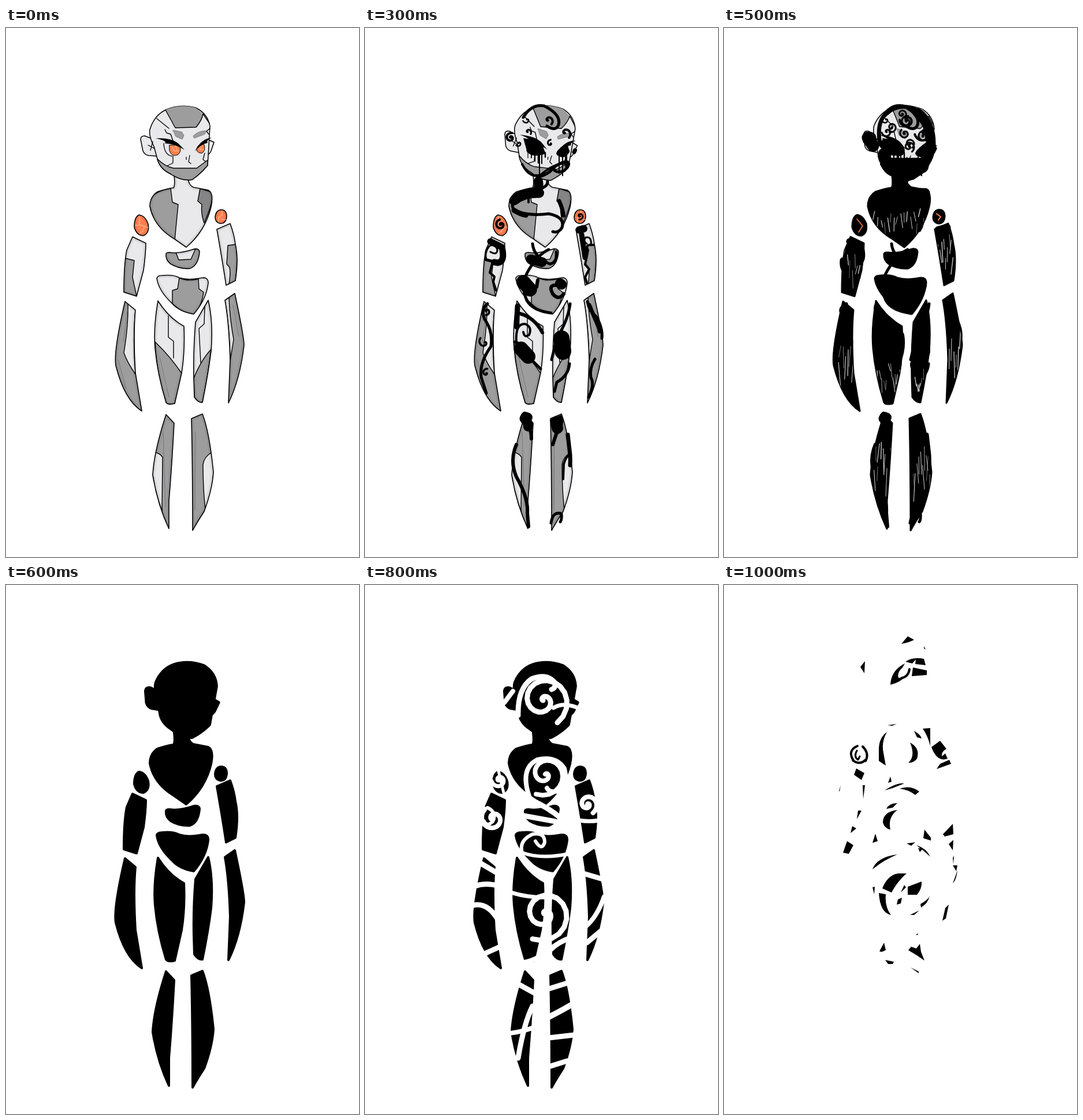
Write an HTML page that moves like this. It is 611 by 917 pixels and loops after 1.1 s.

```html
<!DOCTYPE html>
<html lang="en">
<head>
<meta charset="utf-8">
<title>Ink figure</title>
<style>
html, body { margin: 0; width: 100%; height: 100%; overflow: hidden; background: #fff; }
svg { display: block; width: 100vw; height: 100vh; }
</style>
</head>
<body>
<svg id="stage" viewBox="0 0 611 917" fill="none" stroke-linecap="round" stroke-linejoin="round"></svg>
<script>
const STEP = 100, STEPS = 11;
const LIGHT = '#e9e8eb', DARK = '#9d9d9d', GLOW = '#ff8051';
const stage = document.getElementById('stage');

function el(tag, attrs, parent) {
  const node = document.createElementNS('http://www.w3.org/2000/svg', tag);
  for (const key in attrs) node.setAttribute(key, attrs[key]);
  return parent.appendChild(node);
}
const layer = (parent = stage) => el('g', {}, parent);
const defs = el('defs', {}, stage);
const art = layer(), head = layer(art);
const inkA = layer(), inkB = layer(), drips = layer(), flood = layer(), headFlood = layer();
const solid = layer(), solidHead = layer(solid);
const cutA = layer(), cutB = layer();
const shards = layer(), shardsMid = layer(shards), shardsBoth = layer(shards), shardsEnd = layer(shards);

let seed = 7;
const rnd = (a, b) => a + (b - a) * ((seed = seed * 16807 % 2147483647) / 2147483647);
const fill = (parent, d, color = '#000') => el('path', { d, fill: color }, parent);
const line = (parent, w, d, color = '#000') =>
  el('path', { d, stroke: color, 'stroke-width': w, pathLength: 1 }, parent);

// Spiral from the centre outwards, ending at angle a.
function curl(parent, w, x, y, r, a = 0, turns = 1.5, color) {
  let d = '';
  for (let i = 0; i <= 30; i++) {
    const k = i / 30, t = a - (1 - k) * turns * 6.283;
    d += (i ? 'L' : 'M') + (x + r * k * Math.cos(t)).toFixed(1) + ',' + (y + r * k * Math.sin(t)).toFixed(1);
  }
  line(parent, w, d, color);
}

let count = 0;
// panels: [path, colour]; run: box of the dripping ink, x0 y0 x1 y1 and number of drips
function part(d, base, panels, detail, run) {
  const id = 'clip' + count++;
  el('path', { d }, el('clipPath', { id }, defs));
  const g = layer(art), inner = el('g', { 'clip-path': `url(#${id})` }, g);
  fill(inner, d, base);
  for (const [p, color] of panels) {
    fill(inner, p, color);
    line(inner, 1.4, p);
  }
  line(inner, 8, d, '#00000014');
  if (detail) line(inner, 1.4, detail);
  line(g, 1.6, d);
  el('path', { d, fill: '#000', stroke: '#000', 'stroke-width': 4 }, solid);
  el('path', { d, fill: '#000', stroke: '#000', 'stroke-width': 3 }, flood);
  if (!run) return;
  const [x0, y0, x1, y1, n] = run, h = y1 - y0;
  const wet = el('g', { 'clip-path': `url(#${id})` }, drips);
  const gaps = el('g', { 'clip-path': `url(#${id})` }, flood);
  for (let i = 0; i < n; i++) {
    const x = x0 + (x1 - x0) * (i + .5) / n, lean = rnd(-4, 4);
    line(wet, rnd(1.2, 4), `M${x},${y0}q${lean},${h * .3} ${lean / 2},${h * rnd(.5, 1)}`);
    const top = y0 + h * rnd(.15, .6);
    line(gaps, rnd(.5, 1.5), `M${x + 2},${top}l${lean},${h * rnd(.15, .35)}`, '#c4c4c6');
  }
}

// Torso
part('M291,256Q293,272 290,277Q280,278 262,284Q249,293 249,309Q256,345 292,366L312,380Q345,352 355,310Q360,286 350,281L324,276Q316,272 315,260Z', LIGHT,
  [['M285,278L288,302L298,306L292,368Q240,340 247,300Q255,283 285,278Z', DARK],
   ['M336,278L332,300L339,306Q337,322 343,338Q360,300 357,285Z', '#858585']], '', [256, 300, 352, 372, 17]);
part('M277,392Q276,402 285,409Q300,418 318,417Q333,412 335,388Q334,382 326,383Q300,392 283,389Q277,389 277,392Z', DARK,
  [['M294,389L299,402L320,401L328,383Z', LIGHT]]);
part('M261,434Q262,429 270,429Q290,427 300,433Q315,438 340,433Q350,432 350,442Q347,470 325,496Q300,492 287,477Q264,455 261,434Z', LIGHT,
  [['M300,433L297,452L288,455L288,478Q305,494 325,496Q338,485 342,458L334,452L333,435Q315,440 300,433Z', DARK]]);

// Shoulders and arms
part('M230,324Q241,325 246,340Q249,355 238,360Q226,360 222,345Q222,328 230,324Z', GLOW, []);
part('M372,315Q382,315 382,327Q381,339 371,339Q362,337 362,328Q363,316 372,315Z', GLOW, []);
line(art, 1, 'M231,327V341L246,346M239,346L236,353L231,356M224,342H231M374,317V325L368,328V336M372,332H381', '#ffc9a6');
part('M219,362L242,373Q242,390 238,420L226,465L204,458Q204,410 209,385Z', LIGHT,
  [['M206,399L222,403L219,432L226,465L204,458Q203,425 206,399Z', DARK]], '', [205, 370, 240, 460, 8]);
part('M365,349L388,339Q395,358 397,375Q403,400 397,438L381,446Q374,400 365,349Z', LIGHT,
  [['M384,377L398,375Q402,405 397,438L386,444Q389,425 387,415L382,409Z', DARK]], '', [367, 342, 396, 442, 9]);
part('M206,474L224,489Q220,530 224,598L235,664Q205,645 190,585Q186,560 206,474Z', DARK,
  [['M211,478L224,489Q219,540 224,600Q210,580 204,563Q212,515 211,478Z', LIGHT]], '', [194, 525, 232, 655, 9]);
part('M396,460L379,472Q386,510 388,575L385,650Q405,610 412,550Q412,535 396,460Z', DARK,
  [['M379,472L386,467Q387,500 394,540L388,577Q387,520 379,472Z', LIGHT]], '', [386, 490, 410, 620, 6]);

// Legs
part('M263,473Q282,503 308,517Q310,560 304,598L292,651Q280,654 277,649Q262,600 258,555Q255,520 263,473Z', LIGHT,
  [['M258,544Q285,570 305,600L292,651Q280,654 277,649Q260,595 258,544Z', DARK]],
  'M281,499L281,536L290,543V572', [261, 565, 304, 648, 11]);
part('M350,472L328,510Q324,560 325,607L326,640Q333,650 340,649Q350,600 355,560Q359,510 350,472Z', LIGHT,
  [['M325,607Q338,575 355,557Q350,600 340,649Q333,651 326,640Z', DARK]],
  'M344,483L343,513L334,521L337,580', [327, 580, 351, 647, 8]);
part('M277,670L291,685Q287,760 282,820V868Q262,825 254,775Q256,735 277,670Z', DARK,
  [['M259,736Q266,737 271,744L270,838Q257,800 254,775Q255,748 259,736Z', LIGHT]], '', [256, 695, 288, 845, 10]);
part('M340,669L321,677Q323,760 323,871Q330,858 343,838Q357,800 359,770Q352,700 340,669Z', DARK,
  [['M355,736Q342,745 341,757Q341,800 345,835Q358,800 359,770Q359,750 355,736Z', LIGHT]], '', [324, 695, 356, 845, 10]);
line(art, 1, 'M210,490L203,545M194,575L208,625M266,570L282,640M272,700L276,830M328,700L327,835M393,480L403,535', '#77777a');

// Head
const skull = 'M262,227L256,205Q247,188 249,176Q256,152 276,142Q300,131 328,138Q349,148 353,170L351,205L349,238Q338,252 322,263Q305,266 285,253Q266,244 262,227Z';
const ears = 'M256,193L240,187Q233,187 233,193L237,213Q240,220 247,221L261,222ZM351,194L360,198L355,213Q352,219 349,220Z';
art.appendChild(head);
for (const d of [ears, skull]) {
  fill(head, d, LIGHT);
  line(head, 1.5, d);
  el('path', { d, fill: '#000', stroke: '#000', 'stroke-width': 6 }, solidHead);
}
fill(head, 'M276,142Q300,131 328,138L341,149Q339,160 329,172L293,173Z', DARK);
line(head, 1.4, 'M276,142L293,173L329,172Q339,160 341,149M341,149L352,165M261,157L282,174M275,176L278,182L285,184L291,201M353,174L347,179L351,184');
line(head, 1.3, 'M246,203L257,209M254,197L250,212M273,200Q274,220 287,222M289,222V234L279,239M344,217L341,228L349,234M318,221L316,232L320,235M312,224V228');
for (const d of ['M289,177L304,180L308,186L305,193L294,188Z', 'M324,187Q333,178 347,178L344,184L326,191Z']) {
  fill(head, d, DARK);
  line(head, .7, d, '#666');
}
for (const d of ['M283,203L299,203Q306,213 297,220Q287,224 283,213Z', 'M332,205Q337,200 343,202Q346,213 339,217Q331,217 330,211Z']) {
  fill(head, d, GLOW);
  line(head, 1, d);
}
line(head, 1, 'M288,206L291,213H298M293,204L296,211M336,205V211H342', '#ffc9a6');
fill(head, 'M259,191Q286,190 298,200L309,211Q290,200 275,200Q280,196 259,191Z');
fill(head, 'M356,190Q337,192 327,214Q336,202 349,199Q346,195 356,190Z');
const mask = 'M262,227Q275,240 290,243H330L349,229V238Q338,252 322,263Q305,266 285,253Q266,244 262,227Z';
fill(head, mask, DARK);
line(head, 1.4, mask);

// First vines
line(inkA, 5, 'M274,155Q288,131 310,135Q340,150 335,168Q330,180 315,170');
line(inkA, 5, 'M296,256Q305,260 320,249Q335,232 350,232Q357,236 345,247Q335,252 328,247');
line(inkA, 7, 'M283,212Q290,221 307,216');
line(inkA, 6, 'M337,217Q344,221 351,213');
line(inkA, 2, 'M302,218V258');
line(inkA, 2, 'M347,215V240');
line(inkA, 5, 'M316,266Q317,275 300,280Q265,288 258,298Q250,313 265,319Q290,326 318,322Q347,328 341,346Q335,356 325,353');
line(inkA, 4, 'M283,287V302');
line(inkA, 5, 'M290,374Q292,397 320,409Q333,407 331,388');
line(inkA, 5, 'M318,384Q300,392 283,420Q268,445 280,472Q290,490 322,494');
line(inkA, 6, 'M299,437L297,449Q289,450 288,462L283,457');
line(inkA, 6, 'M333,446Q316,444 325,461Q335,473 344,461');
line(inkA, 3, 'M217,388Q229,395 229,384Q225,373 215,378Q206,390 210,401');
line(inkA, 4, 'M209,402L221,405L216,424L224,431L222,440L227,455');
line(inkA, 3, 'M384,374Q377,370 382,363Q393,361 391,377');
line(inkA, 4, 'M396,376Q380,374 386,385L381,410L388,418L381,432L384,442');
line(inkA, 5, 'M212,478Q200,488 207,505Q222,525 218,552Q198,580 201,605L210,633');
line(inkA, 5, 'M385,474Q388,492 400,500Q412,520 410,538');
line(inkA, 5, 'M398,574Q388,590 391,606Q398,618 387,640');
line(inkA, 4, 'M262,544Q260,512 277,513Q290,518 284,532Q276,538 274,527');
line(inkA, 5, 'M259,544Q275,548 284,571L304,591');
line(inkA, 5, 'M355,478Q352,505 332,538L323,575');
line(inkA, 5, 'M354,582Q352,603 332,614L328,630');
line(inkA, 6, 'M288,712Q288,690 276,684Q268,674 276,668Q290,670 286,678');
line(inkA, 6, 'M262,722Q250,750 262,778Q283,815 281,840L283,864');
line(inkA, 6, 'M323,681L339,674Q343,690 331,704L325,722');
line(inkA, 4, 'M343,782L344,756Q349,740 355,740');
line(inkA, 5, 'M322,858Q325,837 340,842Q341,852 338,856');

// Thick growth
fill(inkB, 'M274,191Q297,193 308,206L313,218Q294,224 281,216Z');
fill(inkB, 'M331,217Q335,206 351,203L354,215Q345,230 332,220Z');
line(inkB, 7, 'M362,215L365,209');
curl(inkB, 4, 252, 190, 12, 2.5, 2);
curl(inkB, 2.5, 280, 159, 10, 5, 1.1);
curl(inkB, 4, 317, 160, 13, 3.2, 1.2);
curl(inkB, 4, 346, 182, 16, 3, 1.1);
curl(inkB, 3, 321, 200, 9, 1, 1.3);
curl(inkB, 3, 282, 180, 9, 3, 1.2);
curl(inkB, 2.5, 266, 200, 8, 5, 1.3);
line(inkB, 4, 'M272,236Q285,262 305,254Q330,232 352,235Q355,250 335,252Q310,260 285,243');
for (let x = 282; x < 314; x += 6) line(inkB, rnd(1, 3), `M${x},216V${rnd(228, 258)}`);
line(inkB, 2, 'M336,218V252M342,220V256M349,215V238');
line(inkB, 16, 'M300,266Q302,278 297,282L315,277');
line(inkB, 17, 'M258,299Q275,285 300,286L348,286');
line(inkB, 9, 'M258,316Q280,330 300,322');
line(inkB, 7, 'M336,300Q350,330 338,350');
curl(inkB, 4, 235, 341, 13, 2, 2);
curl(inkB, 3, 372, 326, 9, 5, 1.7);
line(inkB, 17, 'M287,401L306,406L322,393');
line(inkB, 24, 'M274,440L288,456L296,468');
line(inkB, 18, 'M338,443L342,446');
line(inkB, 11, 'M217,370L237,380Q243,405 230,407L206,403Q204,420 218,426L231,432');
line(inkB, 13, 'M371,350L386,346');
line(inkB, 9, 'M375,358L382,405L384,438');
curl(inkB, 3.5, 210, 491, 10, 4, 1.2);
curl(inkB, 3.5, 207, 545, 15, 0, 1.2);
curl(inkB, 3.5, 210, 598, 11, 1, 1.2);
line(inkB, 7, 'M388,480L405,520Q411,545 404,575');
line(inkB, 9, 'M264,482Q262,515 263,555');
line(inkB, 6, 'M268,495Q295,502 309,532Q313,555 303,580');
line(inkB, 25, 'M270,556L295,583');
line(inkB, 28, 'M340,538L343,560L336,584');
line(inkB, 17, 'M276,677L283,687L280,707');
line(inkB, 20, 'M331,683L335,704');
line(inkB, 7, 'M351,705L355,740Q357,775 344,810');

// Head almost drowned
line(headFlood, 17, 'M335,147Q358,165 358,200Q357,235 325,255');
line(headFlood, 20, 'M277,218Q280,242 315,257');
line(headFlood, 22, 'M290,236H340M294,246H335');
line(headFlood, 21, 'M249,190L258,204');
line(headFlood, 18, 'M278,202L304,213');
line(headFlood, 7, 'M269,195Q265,160 282,148Q300,130 330,140');
curl(headFlood, 3, 308, 149, 8, 1);
curl(headFlood, 3, 316, 162, 10, 5);
curl(headFlood, 3, 290, 172, 9, 2);
curl(headFlood, 3, 313, 183, 9, 4);
curl(headFlood, 3, 345, 188, 10, 5);
curl(headFlood, 3, 320, 206, 10, 1);
line(headFlood, 1.5, 'M230,331L240,343L233,354', GLOW);
line(headFlood, 2, 'M368,322L375,327L371,333', GLOW);

// Gaps wiped into the silhouette
const wipe = (parent, w, d) => line(parent, w, d, '#fff');
wipe(cutA, 9, 'M265,226Q264,180 288,163Q315,152 329,170Q330,179 323,181');
wipe(cutA, 7, 'M326,213Q342,203 366,212');
wipe(cutA, 8, 'M241,204L256,184');
wipe(cutA, 8, 'M284,366Q268,318 298,303Q330,295 345,318Q352,345 337,356Q320,362 315,352');
wipe(cutA, 5, 'M231,322L240,360');
wipe(cutA, 6, 'M212,386Q229,394 221,410Q211,420 206,409');
wipe(cutA, 9, 'M288,373Q318,386 340,405');
wipe(cutA, 6, 'M295,444Q306,462 311,446Q311,428 290,432Q266,443 272,464Q305,476 352,466');
wipe(cutA, 7, 'M370,408Q390,411 404,408');
wipe(cutA, 9, 'M190,522Q210,515 232,522');
wipe(cutA, 8, 'M414,540Q402,575 382,592');
wipe(cutA, 7, 'M250,532Q285,544 331,541');
wipe(cutA, 9, 'M320,633Q335,618 358,611');
wipe(cutA, 8, 'M270,655Q290,652 303,643');
wipe(cutA, 8, 'M250,777Q270,775 292,767');
wipe(cutA, 10, 'M316,750Q340,738 360,726');
curl(cutB, 9, 308, 200, 46, 1, 1.6, '#fff');
curl(cutB, 8, 312, 328, 38, 2, 1.5, '#fff');
curl(cutB, 7, 232, 338, 13, 3, 1.2, '#fff');
curl(cutB, 8, 222, 405, 22, 4, 1.4, '#fff');
curl(cutB, 8, 385, 380, 18, 1, 1.4, '#fff');
curl(cutB, 9, 310, 570, 48, 2, 1.7, '#fff');
wipe(cutB, 9, 'M196,480L230,500M188,555Q212,550 230,580M205,640L238,625');
wipe(cutB, 9, 'M378,500L412,510M384,620L408,600M275,400L330,410');
wipe(cutB, 9, 'M262,690L298,710M318,700L350,690M265,820Q275,760 290,730M318,785L362,780M318,835L350,825');

// Remains of the silhouette
const mid = d => fill(shardsMid, d), both = d => fill(shardsBoth, d), end = d => fill(shardsEnd, d);
mid('M293,154Q305,143 320,134L353,148L346,157Q318,146 293,154ZM271,151L286,137L278,149ZM353,157L361,163L366,174ZM345,152L349,146L346,153Z');
mid('M258,206Q260,174 288,153Q266,178 264,209ZM273,209Q272,182 290,168Q278,190 281,216Z');
mid('M236,186L243,178L251,178L241,199Z');
line(shardsMid, 7, 'M292,211Q290,188 307,179Q316,174 326,173');
line(shardsMid, 8, 'M304,207Q318,206 319,195Q317,187 309,189');
mid('M328,173Q344,173 349,191L325,188ZM324,205Q335,192 352,194Q352,210 345,222Q335,210 324,205ZM315,240Q320,226 327,222L336,237Q326,245 315,240ZM284,218Q293,238 307,242L314,228Q298,226 284,218Z');
mid('M291,260Q330,266 355,236Q345,268 308,269Q297,268 291,260Z');
end('M307,146L318,133L329,139Q320,144 307,146ZM236,186L244,176L243,197ZM346,150L349,156L346,154Z');
end('M288,217Q289,192 313,180L309,187Q299,196 302,205L313,203Q306,212 291,216ZM314,177Q327,168 346,172L349,183L331,181L332,173L326,180ZM327,187L351,192V200L325,202Z');
line(shardsEnd, 4, 'M308,205Q319,203 321,190');

mid('M285,289Q315,283 340,299Q310,289 285,289ZM270,298L284,288L276,297ZM324,277L341,280L330,279Z');
mid('M268,331Q267,307 294,298L285,306Q275,318 276,332ZM274,337L292,334Q296,346 309,349V358Q285,358 274,337Z');
mid('M284,327Q288,304 313,304Q334,308 336,326Q334,345 318,348Q302,344 300,328Z');
curl(shardsMid, 5, 318, 329, 13, 3.6, 1.1, '#fff');
wipe(shardsMid, 5, 'M292,322Q298,311 314,311');
both('M344,293L357,292V323Q353,306 344,293ZM329,297Q340,303 342,310L334,308Z');
end('M268,333Q267,309 282,299Q272,316 276,335L280,357L268,349ZM322,317Q340,327 334,345Q328,353 319,352Q332,341 322,317ZM283,287L299,285L291,288Z');
mid('M361,326L373,315L382,319Q370,327 373,343L362,340ZM367,347L384,329L396,357Q380,349 374,361ZM376,367Q388,362 394,370L384,372Z');
mid('M371,395Q374,420 388,426L382,407Q388,398 378,388ZM387,386L396,378L400,402Q390,402 387,386ZM378,427L398,430Q397,440 380,448ZM380,468L396,463L397,471L384,480Z');
mid('M389,496L404,488Q410,500 408,512L396,507ZM396,517L408,524L405,541Q395,530 396,517ZM411,560Q411,580 404,592Q409,575 411,560ZM393,555L406,552L398,562Z');
both('M378,626L383,604L389,598L384,622Z');
end('M359,325L374,314L385,328Q376,333 377,341L383,336L387,345Q369,352 359,325ZM368,363L374,354L390,347L393,354ZM379,476L396,458L397,476L382,480ZM389,493L397,486L396,504Z');
end('M396,517L398,513L397,528ZM396,530H404L402,540ZM404,538Q402,556 396,561Q401,548 404,538Z');

line(shardsBoth, 4, 'M224,348Q213,331 231,323M240,324Q252,336 245,349');
line(shardsBoth, 3, 'M230,331Q224,342 232,347L235,341');
line(shardsEnd, 4, 'M223,348Q235,357 245,347');
mid('M223,365L241,372L239,386L226,380ZM203,388L215,376L222,385Q212,392 210,408ZM205,411Q215,423 230,412L223,396L214,408ZM235,390L244,391L240,414ZM207,425L231,424L235,440Q222,455 214,440ZM199,430L204,408L202,424Z');
mid('M205,460L214,461L206,473ZM232,449L229,463L224,466ZM204,491L222,486Q230,503 223,522L203,514Z');
mid('M191,550L199,527L204,538L224,546V570Q212,546 191,550ZM189,581L193,562L205,559Q194,570 189,581ZM203,590Q208,574 219,570Q211,578 203,590ZM222,641L231,643L234,656L224,655Z');
wipe(shardsMid, 5, 'M190,541Q206,534 226,543M219,398Q232,390 243,398M226,362L234,388');
end('M225,373L229,362L243,370L238,382ZM240,391L244,391L241,415ZM232,435H238L230,450ZM222,462L229,466L219,474ZM206,508L213,488L224,495L216,510ZM199,401L202,391L200,402Z');

mid('M282,386L286,377L288,385ZM305,377L326,382L312,381ZM278,397L307,387L336,402L320,402L300,396Z');
mid('M275,452Q276,431 298,430Q314,433 314,448L340,440L343,457L333,468L302,467L286,468Q276,464 275,452Z');
wipe(shardsMid, 5, 'M284,462Q282,440 299,438Q310,446 300,455Q290,456 292,446M300,455Q320,464 346,457');
wipe(shardsMid, 4, 'M304,391L316,402');
end('M284,387L288,376L290,385ZM278,400Q300,386 312,388L292,396ZM304,397Q323,390 338,402L331,408Q320,399 304,397ZM281,432Q286,422 300,422L292,430ZM275,456Q275,437 300,434Q283,447 288,468Q278,466 275,456Z');
both('M257,491L262,475L266,488ZM345,483L347,468L358,482V487ZM333,495Q350,500 357,515Q345,504 333,495ZM316,492L331,490L324,496ZM336,500L344,501L339,507Z');
both('M257,537Q264,516 300,511Q277,521 262,533ZM274,570Q283,547 301,544H316Q300,558 290,577ZM318,581V567L342,558Q343,570 334,581ZM268,578L280,580Q278,602 289,616Q270,612 268,578ZM299,598L301,589L308,586L306,596Z');
both('M322,616L338,608L329,616ZM340,597Q353,590 356,583Q353,596 341,603ZM257,568L261,567L260,580ZM306,577L312,564L315,568Z');
mid('M300,616Q322,612 344,600Q330,620 300,622ZM262,514Q285,497 311,503Q285,505 262,514ZM340,513L360,515L359,535Z');

both('M269,679L277,664L280,677L273,680ZM279,694L294,697L292,701H284ZM319,677L324,671L333,674L339,666L341,680L347,695Q333,685 319,677ZM323,707L337,714V717ZM332,650L336,648L335,651Z');
mid('M255,741Q265,717 285,725L288,741L269,738L262,752L265,766L254,770ZM272,760L288,748L287,768L270,772ZM256,778L265,777L261,800ZM274,828Q273,800 270,785L286,780L285,823Q282,829 276,828ZM326,757Q345,736 360,768L328,780ZM326,790L358,785Q352,808 336,822Q326,808 326,790Z');
mid('M280,865L284,868L282,869ZM323,861L336,855L333,860ZM320,835L326,830L325,836ZM336,722L347,723L344,727Z');

const show = (node, on) => node.setAttribute('display', on ? 'inline' : 'none');
function grow(group, amount) {
  show(group, amount > 0);
  for (const path of group.children) {
    path.setAttribute('stroke-dasharray', amount < 1 ? `${amount} 2` : 'none');
  }
}

function draw(time) {
  const step = Math.floor(time / STEP) % STEPS;
  const tilt = `rotate(${Math.min(step, 2) * 3.4} 315 264)`;
  head.setAttribute('transform', tilt);
  solidHead.setAttribute('transform', tilt);
  show(art, step < 6);
  grow(inkA, step < 6 ? Math.min(step / 2, 1) : 0);
  grow(inkB, step < 6 ? Math.max(0, Math.min((step - 2) / 2, 1)) : 0);
  show(drips, step === 4);
  show(flood, step === 5);
  show(headFlood, step === 5);
  show(solid, step > 5 && step < 9);
  show(cutA, step === 7 || step === 8);
  show(cutB, step === 8);
  show(shards, step > 8);
  show(shardsMid, step === 9);
  show(shardsEnd, step === 10);
  shards.setAttribute('transform', `translate(0 ${step === 10 ? -44 : 0})`);
}

const start = performance.now();
function tick() {
  draw(performance.now() - start);
  requestAnimationFrame(tick);
}
draw(0);
requestAnimationFrame(tick);
</script>
</body>
</html>
```
